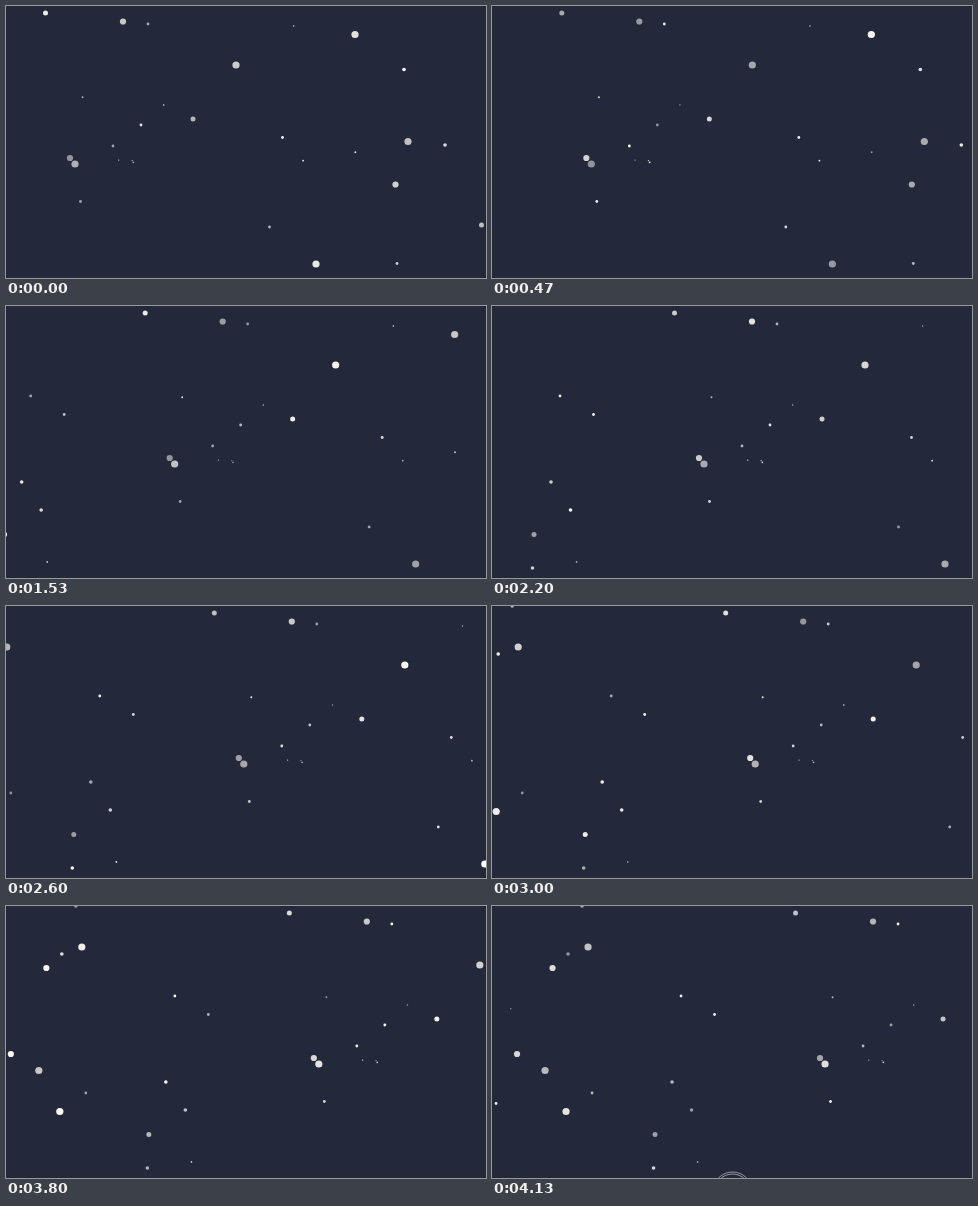
An HTML page with a canvas for the animation above (4.19 s loop, 480 by 272 pixels).

```html
<!DOCTYPE html>
<html lang="en">
<head>
<meta charset="utf-8">
<title>Drifting stars</title>
<style>
  html, body { margin: 0; width: 100%; height: 100%; overflow: hidden; background: #24283b; }
  canvas { display: block; width: 480px; height: 272px; }
</style>
</head>
<body>
<canvas id="sky" width="480" height="272"></canvas>
<script>
const ctx = document.getElementById('sky').getContext('2d');
const W = 480, H = 272;
const LOOP = 4190, STEP = 200 / 3, LAST = 62;
const SKY = '#24283b', STAR = '#fffcf5', RING = '#fff';

function random(a, b) {
  const v = Math.sin(a * 12.9898 + b * 78.233) * 43758.5453;
  return v - Math.floor(v);
}

// Starting points by radius; those left of the stage drift in later
const layout = {
  3.6: [[349, 28.5], [230, 59], [402, 135.5], [69, 158], [310, 258],
        [-168, 41], [-190, 205.5], [-211, 164.5]],
  3.1: [[117, 15.5], [64, 152], [389.5, 178.5], [-203.5, 62], [-239, 148]],
  2.5: [[39.5, 7], [187, 113], [475.5, 219], [-101, 228.5]],
  1.8: [[398, 63.5], [439, 139], [-188, 48], [-102.5, 262], [-84, 176],
        [-64.5, 204], [-174, 0]],
  1.4: [[142, 18], [135, 119], [107, 140], [276.5, 131.5], [74.5, 195.5],
        [263.5, 221], [391, 257.5], [-41.5, 108.5], [-75, 90], [-164, 187],
        [-260, 197.5]]
};

const stars = Object.entries(layout).flatMap(([r, points]) =>
  points.map(([x, y]) => ({ x, y, r: +r })));

// Faint dust
for (let i = 1; i <= 10; i++) {
  stars.push({
    x: -260 + (W + 260) * random(i, 1),
    y: H * random(i, 2),
    r: .6 + .4 * random(i, 3)
  });
}

// Steady drift that lags a little towards the end
const driftAt = step => step * 13 / 3 - .0055 * Math.max(0, step - 33) ** 2;

const glowAt = (id, step) => .5 + .5 * random(id + 1, step + 1);

function circle(x, y, r) {
  ctx.beginPath();
  ctx.arc(x, y, r, 0, Math.PI * 2);
}

function drawStars(step) {
  const dx = driftAt(step);
  ctx.fillStyle = STAR;
  stars.forEach(({ x, y, r }, id) => {
    ctx.globalAlpha = glowAt(id, step);
    circle(x + dx, y, r);
    ctx.fill();
  });
}

// A double ring rises over the bottom edge at the end
function drawRing(step) {
  const y = 285.5 + (LAST - step) * 4;
  ctx.globalAlpha = .5;
  ctx.strokeStyle = RING;
  for (const r of [19.5, 17.5]) {
    circle(240.5, y, r);
    ctx.stroke();
  }
}

function draw(step) {
  ctx.globalAlpha = 1;
  ctx.fillStyle = SKY;
  ctx.fillRect(0, 0, W, H);
  drawStars(step);
  drawRing(step);
}

const start = performance.now();
let shown = -1;
function tick() {
  const t = (performance.now() - start) % LOOP;
  const step = Math.min(LAST, Math.floor((t + 5) / STEP));
  if (step !== shown) draw(shown = step);
  requestAnimationFrame(tick);
}
tick();
</script>
</body>
</html>
```
